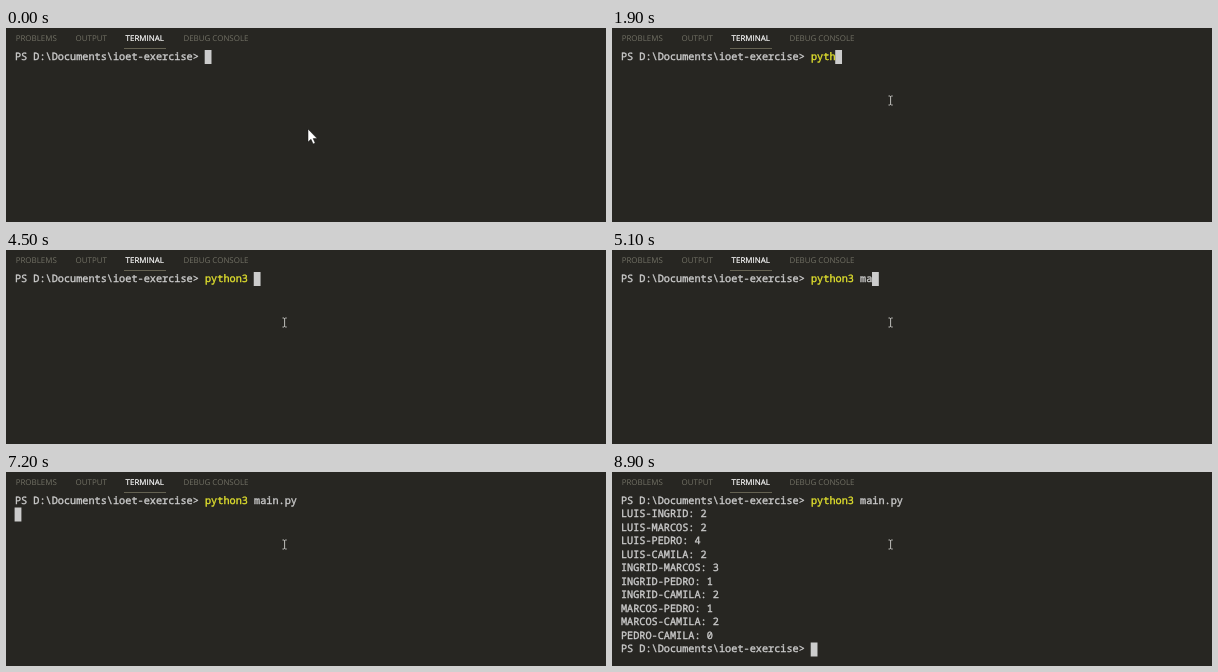
Animation, 600 px wide and 194 px high, one loop 9000 ms. Source, as an HTML page:

```html
<!DOCTYPE html>
<html lang="en">
<head>
<meta charset="utf-8">
<title>Terminal session</title>
<style>
  html, body { margin: 0; width: 100%; height: 100%; overflow: hidden; background: #272622; }
  svg { display: block; }
  text { white-space: pre; text-rendering: geometricPrecision; fill: currentColor; stroke: currentColor; }
  .tab { font: 7.95px "Open Sans", "Noto Sans", sans-serif; color: #717064; stroke-width: 0; }
  .tab.active { color: #fff; stroke-width: .2px; }
  .mono { font: 10.22px "Noto Sans Mono", "DejaVu Sans Mono", monospace; color: #cccccc; stroke-width: .35px; }
  .mono.command { color: #e2e22e; }
</style>
</head>
<body>
<svg id="stage" width="600" height="194" viewBox="0 0 600 194">
  <text class="tab" x="9.7" y="12.8">PROBLEMS</text>
  <text class="tab" x="69.6" y="12.8">OUTPUT</text>
  <text class="tab active" x="119.6" y="12.8">TERMINAL</text>
  <text class="tab" x="177.4" y="12.8">DEBUG CONSOLE</text>
  <rect x="118" y="20.2" width="42" height=".8" fill="#75715e"/>
  <g id="lines"></g>
  <rect id="block" width="6.8" height="14" fill="#cccccc"/>
  <path id="arrow" d="M0 0V13L3 10.3L5.1 15L7.2 14.1L5.2 9.6H9.2Z" fill="#fff" stroke="#111" stroke-width=".5"/>
  <path id="beam" d="M276.5 68H278L278.6 68.6L279.2 68H280.7M278.6 68.5V76.5M276.5 77H278L278.6 76.4L279.2 77H280.7"
        fill="none" stroke="#d0d0cc" stroke-width=".9"/>
</svg>
<script>
const LOOP = 9000, LEFT = 8.9, TOP = 22, ROW = 13.5, COL = 6.132;
const PROMPT = "PS D:\\Documents\\ioet-exercise> ";
const COMMAND_LENGTH = 7;
const RESULTS = [
  "LUIS-INGRID: 2", "LUIS-MARCOS: 2", "LUIS-PEDRO: 4", "LUIS-CAMILA: 2",
  "INGRID-MARCOS: 3", "INGRID-PEDRO: 1", "INGRID-CAMILA: 2",
  "MARCOS-PEDRO: 1", "MARCOS-CAMILA: 2", "PEDRO-CAMILA: 0"
];

// [start time, text after the prompt]
const TYPING = [
  [0, ""], [1300, "p"], [1400, "py"], [1600, "pyt"], [1700, "pyth"],
  [2100, "pytho"], [2200, "python"], [2500, "python "],
  [3600, "python"], [3800, "python3"], [4100, "python3 "],
  [4900, "python3 m"], [5100, "python3 ma"], [5200, "python3 mai"],
  [5300, "python3 main"], [5500, "python3 main."],
  [5900, "python3 main.p"], [6100, "python3 main.py"]
];
// [start time, x, y] of the arrow tip
const POINTER = [[0, 302, 101], [400, 288, 84], [500, 277.7, 72]];
const BEAM_AT = 1100, ENTER_AT = 7000, OUTPUT_AT = 7400;

const $ = id => document.getElementById(id);
const at = (steps, t) => steps.findLast(step => step[0] <= t);
const show = (el, on) => el.setAttribute("visibility", on ? "visible" : "hidden");

function addText(text, row, col = 0) {
  const el = document.createElementNS("http://www.w3.org/2000/svg", "text");
  el.setAttribute("class", "mono");
  el.setAttribute("x", LEFT + col * COL);
  el.setAttribute("y", TOP + row * ROW + 9.95);
  el.textContent = text;
  $("lines").append(el);
  return el;
}

addText(PROMPT, 0);
const command = addText("", 0, PROMPT.length);
command.classList.add("command");
const argument = addText("", 0, PROMPT.length + COMMAND_LENGTH);
const output = [...RESULTS, PROMPT].map((line, i) => addText(line, i + 1));

function placeBlock(row, col) {
  $("block").setAttribute("x", LEFT - .3 + col * COL);
  $("block").setAttribute("y", TOP + row * ROW);
}

function draw(t) {
  const typed = at(TYPING, t)[1];
  command.textContent = typed.slice(0, COMMAND_LENGTH);
  argument.textContent = typed.slice(COMMAND_LENGTH);
  output.forEach(line => show(line, t >= OUTPUT_AT));

  if (t >= OUTPUT_AT) placeBlock(output.length, PROMPT.length);
  else if (t >= ENTER_AT) placeBlock(1, 0);
  else placeBlock(0, PROMPT.length + typed.length);

  const [, x, y] = at(POINTER, t);
  $("arrow").setAttribute("transform", `translate(${x} ${y})`);
  show($("arrow"), t < BEAM_AT);
  show($("beam"), t >= BEAM_AT);
}

const start = performance.now();
function tick() {
  draw((performance.now() - start) % LOOP);
  requestAnimationFrame(tick);
}
draw(0);
requestAnimationFrame(tick);
</script>
</body>
</html>
```
